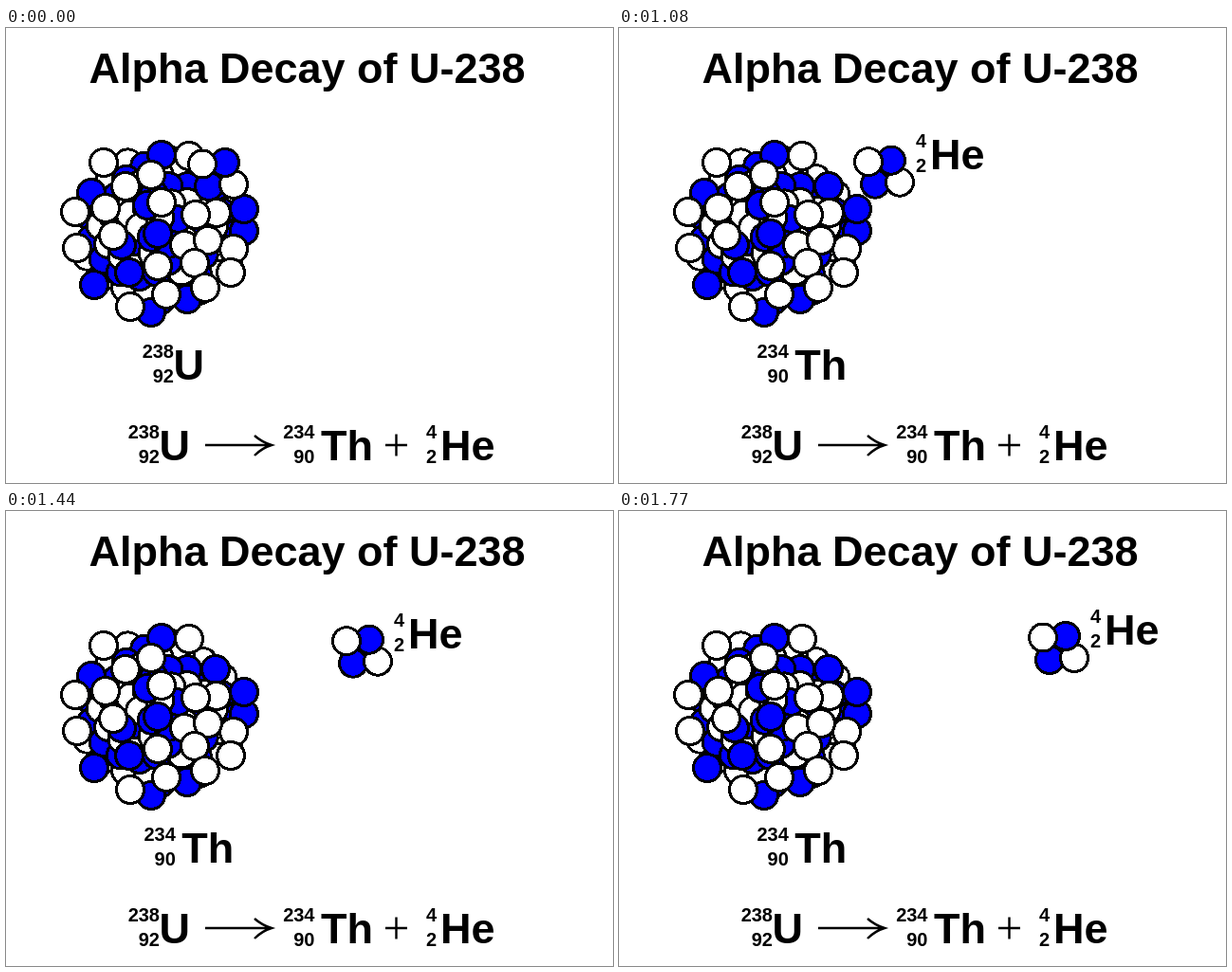
Recreate the animation shown at these times as an HTML page. Size 640x480 px, loop 3600 ms.

```html
<!DOCTYPE html>
<html lang="en">
<head>
<meta charset="utf-8">
<title>Alpha Decay</title>
<style>
  html, body { margin: 0; width: 100%; height: 100%; overflow: hidden; background: #fff; }
  svg { display: block; width: 100%; height: 100%; }
  text { font: bold 45px "Liberation Sans", Arial, sans-serif; }
  .num { font-size: 20px; text-anchor: end; }
  circle { stroke: #000; stroke-width: 3; shape-rendering: crispEdges; }
  path { fill: none; stroke: #000; stroke-width: 2.4; }

  .before { animation: before 3600ms step-end infinite; }
  .after { animation: after 3600ms step-end infinite; }
  .alpha { animation: eject 3600ms infinite; }
  @keyframes before {
    0% { visibility: visible; }
    24.14%, 100% { visibility: hidden; }
  }
  @keyframes after {
    0% { visibility: hidden; }
    24.14%, 100% { visibility: visible; }
  }
  @keyframes eject {
    0% { transform: translate(0, 0); }
    24.14% { transform: translate(0, 0); animation-timing-function: steps(30, end); }
    49.14%, 100% { transform: translate(240px, -10px); }
  }
</style>
</head>
<body>
<svg viewBox="0 0 640 480">
  <text x="87.5" y="58">Alpha Decay of U-238</text>

  <g id="nucleus"></g>
  <g class="alpha">
    <g id="helium"></g>
    <g class="after" id="heLabel"></g>
  </g>
  <g class="before" id="uLabel"></g>
  <g class="after" id="thLabel"></g>

  <g id="equation"></g>
  <path d="M210 440H279M262 430Q270 437 280 440Q270 443 262 451"/>
  <path d="M400 440H423M411.5 428.5V451.5"/>
</svg>
<script>
  const NS = "http://www.w3.org/2000/svg";
  const byId = id => document.getElementById(id);

  function add(parent, tag, attrs, content = "") {
    const el = document.createElementNS(NS, tag);
    for (const key in attrs) el.setAttribute(key, attrs[key]);
    el.textContent = content;
    parent.appendChild(el);
  }

  const WHITE = "#fff", BLUE = "#00f";
  function balls(parent, fill, ...points) {
    for (const [cx, cy] of points) add(parent, "circle", { cx, cy, r: 14.5, fill });
  }

  // Inner nucleons: a sunflower spiral, drawn from the rim to the middle
  function core(parent, cx, cy, radius, count) {
    const golden = Math.PI * (3 - Math.sqrt(5));
    for (let i = count; i > 0; i--) {
      const r = radius * Math.sqrt(i / count), a = i * golden;
      balls(parent, i % 2 ? BLUE : WHITE, [cx + r * Math.cos(a), cy + r * Math.sin(a)]);
    }
  }

  // Isotope symbol, placed by the left edge of its letters and its middle line
  function isotope(g, mass, charge, symbol, x, mid, gap) {
    add(g, "text", { class: "num", x: x - gap, y: mid - 7 }, mass);
    add(g, "text", { class: "num", x: x - gap, y: mid + 19 }, charge);
    add(g, "text", { x, y: mid + 16 }, symbol);
  }
  const uranium = (g, x, mid) => isotope(g, 238, 92, "U", x, mid, -0.5);
  const thorium = (g, x, mid) => isotope(g, 234, 90, "Th", x, mid, 6.5);
  const helium = (g, x, mid) => isotope(g, 4, 2, "He", x, mid, 4);

  // Surface nucleons, back to front, over the core
  const n = byId("nucleus");
  core(n, 161, 214, 80, 64);
  balls(n, BLUE, [164, 134], [90, 174], [221, 167], [153, 300], [191, 286], [251, 214]);
  balls(n, WHITE, [222, 195], [240, 233], [188, 229]);
  balls(n, BLUE, [149, 187], [251, 191], [93, 271], [122, 229]);
  balls(n, WHITE,
    [103, 142], [193, 135], [153, 155], [126, 167], [73, 194], [105, 190],
    [164, 184], [200, 197], [113, 219], [75, 232], [213, 224], [199, 248],
    [237, 258], [160, 251], [131, 294], [169, 281], [210, 274]);
  balls(n, BLUE, [160, 217], [130, 258]);

  const he = byId("helium");
  balls(he, BLUE, [214, 167]);
  balls(he, WHITE, [240, 165]);
  balls(he, BLUE, [231, 142]);
  balls(he, WHITE, [207, 143.5]);

  const eq = byId("equation");
  uranium(eq, 161.5, 440);
  thorium(eq, 332, 440);
  helium(eq, 458, 440);

  uranium(byId("uLabel"), 176.5, 355);
  thorium(byId("thLabel"), 185.3, 355);
  helium(byId("heLabel"), 272, 135);
</script>
</body>
</html>
```
